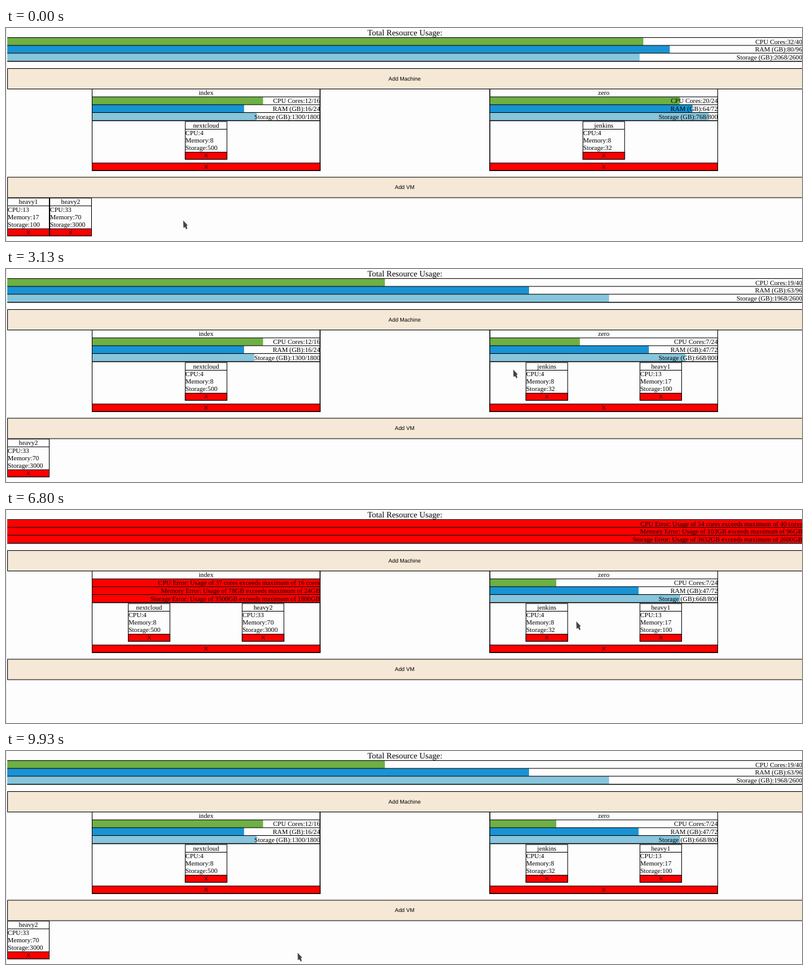
An HTML page with a canvas for the animation above (9.99 s loop, 1280 by 344 pixels).

```html
<!DOCTYPE html>
<html lang="en">
<head>
<meta charset="utf-8">
<title>Resource planner</title>
<style>
  html, body { margin: 0; width: 100%; height: 100%; overflow: hidden; background: #fdfdfd; }
  canvas { display: block; }
</style>
</head>
<body>
<canvas id="stage" width="1280" height="344"></canvas>
<script>
const ctx = document.getElementById('stage').getContext('2d');
ctx.textRendering = 'geometricPrecision';

const LOOP = 9990, STEP = 1000 / 15, EASE_MS = 500;
const PAPER = '#fdfdfd', RED = '#fe0000', BEIGE = '#f5e8d6';
const SERIF = '"Liberation Serif", serif', SANS = '"Liberation Sans", sans-serif';
const BODY = `10.667px ${SERIF}`, TITLE = `13.333px ${SERIF}`, BUTTON = `8.89px ${SANS}`;
const ROW = 12.67, CARD_W = 67, BOX_W = 366.5;

// Resources are listed as [cores, memory, storage].
const KINDS = [
  { label: 'CPU Cores', error: 'CPU', unit: ' cores', color: '#6eb044' },
  { label: 'RAM (GB)', error: 'Memory', unit: 'GB', color: '#1993d4' },
  { label: 'Storage (GB)', error: 'Storage', unit: 'GB', color: '#86c5dc' }
];
const MACHINES = [
  { name: 'index', x: 138.5, max: [16, 24, 1800] },
  { name: 'zero', x: 778, max: [24, 72, 800] }
];
const VMS = [
  { name: 'nextcloud', need: [4, 8, 500] },
  { name: 'jenkins', need: [4, 8, 32] },
  { name: 'heavy1', need: [13, 17, 100] },
  { name: 'heavy2', need: [33, 70, 3000] }
];
const TOTAL_MAX = [40, 96, 2600];

// Where every VM sits after each drop; 'pool' is the unassigned row.
const DROPS = [
  { at: -EASE_MS, homes: ['index', 'zero', 'pool', 'pool'] },
  { at: 1560, homes: ['index', 'zero', 'index', 'pool'] },
  { at: 2880, homes: ['index', 'zero', 'zero', 'pool'] },
  { at: 5350, homes: ['index', 'zero', 'zero', 'index'] },
  { at: 6850, homes: ['index', 'zero', 'zero', 'zero'] },
  { at: 8700, homes: ['index', 'zero', 'zero', 'pool'] }
];

// Pointer path: [ms, x, y]
const POINTER = [
  [0, 285, 311], [600, 45, 300], [800, 45, 300], [1540, 387, 173], [1670, 388.5, 171],
  [2000, 395, 176], [2820, 816, 163], [3400, 815.5, 162], [4480, 57, 299], [4680, 57, 299],
  [5320, 455, 184], [5720, 455, 184], [6000, 415, 180], [6150, 415, 180], [6830, 920, 180],
  [7600, 929, 180], [7850, 1080, 180], [8000, 1080, 180], [8680, 430, 308], [9300, 469, 326],
  [9990, 469, 326]
];

function ease(p) {
  if (p >= 1) return 1;
  const bezier = (u, a, b) => 3 * (1 - u) ** 2 * u * a + 3 * (1 - u) * u * u * b + u ** 3;
  let lo = 0, hi = 1;
  for (let i = 0; i < 20; i++) {
    const mid = (lo + hi) / 2;
    if (bezier(mid, 0.25, 0.25) < p) lo = mid; else hi = mid;
  }
  return bezier(lo, 0.1, 1);
}

function text(value, x, y, font = BODY, align = 'center') {
  ctx.font = font;
  ctx.textAlign = align;
  ctx.fillStyle = '#000';
  ctx.fillText(value, x, y);
}

function box(x, y, w, h, fill = PAPER) {
  ctx.fillStyle = fill;
  ctx.fillRect(x, y, w, h);
  ctx.lineWidth = 1;
  ctx.strokeStyle = '#000';
  ctx.strokeRect(x, y, w, h);
}

function rule(x, y, w, thick = 1) {
  ctx.fillStyle = '#000';
  ctx.fillRect(x, y - thick / 2, w, thick);
}

function button(label, y) {
  box(2.5, y, 1280, 33, BEIGE);
  text(label, 641, y + 19.3, BUTTON);
}

function removeButton(x, y, w, h) {
  box(x, y, w, h, RED);
  text('X', x + w / 2, y + h / 2 + 3.2, BUTTON);
}

const usage = (homes, kind, isCounted) =>
  VMS.reduce((sum, vm, i) => sum + (isCounted(homes[i]) ? vm.need[kind] : 0), 0);

function meters(x, y, w, max, isCounted, now, before, progress) {
  KINDS.forEach((kind, i) => {
    const top = y + i * ROW, limit = max[i];
    const used = usage(now.homes, i, isCounted);
    const usedBefore = usage(before.homes, i, isCounted);
    const failed = used > limit;
    // A bar that was in error is replaced at once instead of sliding.
    const shown = usedBefore > limit ? used : usedBefore + (used - usedBefore) * progress;
    ctx.fillStyle = failed ? RED : kind.color;
    ctx.fillRect(x, top, failed ? w : w * (1 - shown / limit), ROW);
    rule(x, top, w);
    const label = failed
      ? `${kind.error} Error: Usage of ${used}${kind.unit} exceeds maximum of ${limit}${kind.unit}`
      : `${kind.label}:${limit - used}/${limit}`;
    text(label, x + w, top + 10.2, BODY, 'right');
  });
  rule(x, y + 3 * ROW + 0.4, w, 1.4);
}

function card(vm, x, y) {
  box(x, y, CARD_W, 61);
  rule(x, y + 12.5, CARD_W);
  text(vm.name, x + CARD_W / 2, y + 9.5);
  ['CPU', 'Memory', 'Storage'].forEach((label, i) =>
    text(`${label}:${vm.need[i]}`, x + 0.3, y + 22.4 + 12 * i, BODY, 'left'));
  removeButton(x, y + 49.5, CARD_W, 11.5);
}

function pointer(t) {
  const next = Math.max(1, POINTER.findIndex(p => p[0] > t));
  const [t0, x0, y0] = POINTER[next - 1], [t1, x1, y1] = POINTER[next];
  const p = (t - t0) / (t1 - t0), s = p * p * (3 - 2 * p);
  ctx.save();
  ctx.translate(x0 + (x1 - x0) * s, y0 + (y1 - y0) * s);
  ctx.beginPath();
  for (const [x, y] of [[0, 0], [7, 7.5], [5.3, 8.5], [6.5, 13], [5, 14], [3, 10.5], [0.4, 11.5]]) ctx.lineTo(x, y);
  ctx.closePath();
  ctx.lineWidth = 0.8;
  ctx.strokeStyle = '#ddd';
  ctx.stroke();
  ctx.fillStyle = '#444';
  ctx.fill();
  ctx.restore();
}

function draw(t) {
  let index = DROPS.length - 1;
  while (DROPS[index].at > t) index--;
  const now = DROPS[index], before = DROPS[Math.max(0, index - 1)];
  const progress = ease((t - now.at) / EASE_MS);
  const living = home => VMS.filter((vm, i) => now.homes[i] === home);

  ctx.fillStyle = PAPER;
  ctx.fillRect(0, 0, 1280, 344);
  ctx.fillStyle = '#e2e4ee';
  ctx.fillRect(0, 0, 1, 344);

  text('Total Resource Usage:', 641.5, 12, TITLE);
  meters(2, 15.4, 1278.5, TOTAL_MAX, home => home !== 'pool', now, before, progress);
  button('Add Machine', 65.5);

  for (const { name, x, max } of MACHINES) {
    box(x, 98.5, BOX_W, 132);
    text(name, x + BOX_W / 2, 108);
    meters(x, 111.2, BOX_W, max, home => home === name, now, before, progress);
    ctx.strokeRect(x, 98.5, BOX_W, 132);
    const vms = living(name);
    vms.forEach((vm, i) =>
      card(vm, x + BOX_W * (i + 0.5) / vms.length - CARD_W / 2, 151));
    removeButton(x, 218, BOX_W, 12);
  }

  button('Add VM', 241);
  living('pool').forEach((vm, i) => card(vm, 2.5 + 68 * i, 274.7));
  pointer(t);
}

const start = performance.now();
function tick() {
  const t = (performance.now() - start) % LOOP;
  draw(Math.floor((t + 4) / STEP) * STEP % LOOP);
  requestAnimationFrame(tick);
}
tick();
</script>
</body>
</html>
```
